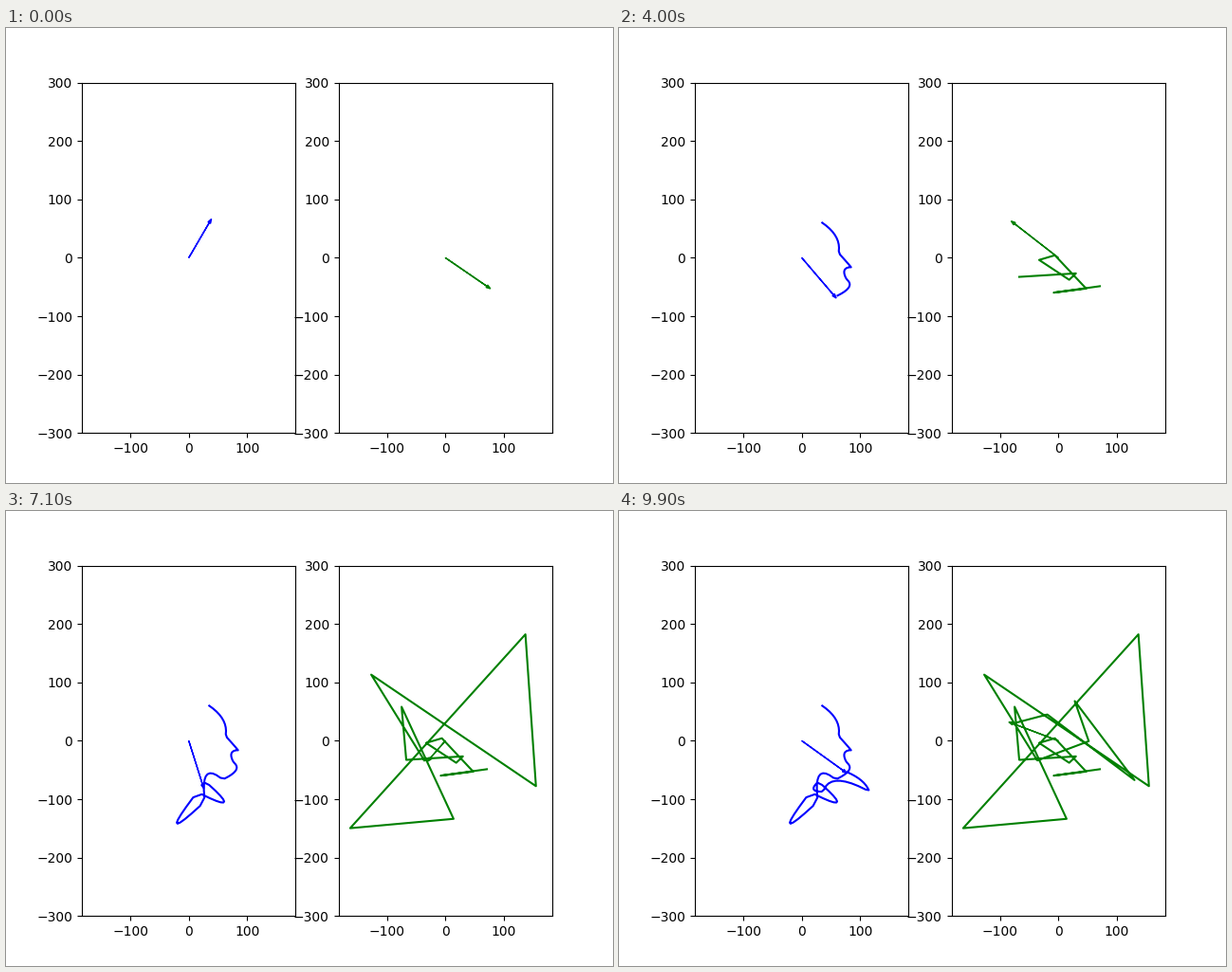
Recreate the animation shown at these times as a matplotlib script. Size 640 px wide and 480 px high, loop 10 s.

```python
import numpy as np
import matplotlib.pyplot as plt
from matplotlib.animation import FuncAnimation

FRAMES = 100
LEG = 10     # frames per leg
DT = 0.1
START = (35, 60)

# Velocity on the first and last frame of every leg
KEYS = np.array([
    (71, -48.7), (-8, -59.7),
    (47.5, -52.7), (-6, 4.3),
    (-33, -3.7), (18.5, -37.7),
    (30, -26.7), (-67, -32.7),
    (-75, 58.3), (14, -133.7),
    (-163, -149.7), (137, 182.3),
    (155, -77.7), (-127, 113.3),
    (-36, -33.7), (52, -0.7),
    (28, 68), (130.3, -67.3),
    (-19, 45), (-78, 29.5),
])

frames = np.arange(FRAMES)
leg_starts = np.arange(0, FRAMES, LEG)
key_frames = np.column_stack([leg_starts, leg_starts + LEG - 1]).ravel()

# Velocity is linear between keys; position is its trapezoidal integral
vel = np.column_stack([np.interp(frames, key_frames, k) for k in KEYS.T])
steps = (vel[:-1] + vel[1:]) / 2 * DT
pos = np.cumsum(np.vstack([START, steps]), axis=0)

fig, axes = plt.subplots(1, 2, figsize=(6.4, 4.8), dpi=100)


def make_plot(ax, data, color):
    ax.set_xlim(-183, 183)
    ax.set_ylim(-300, 300)
    ax.set_xticks([-100, 0, 100])
    arrow = ax.arrow(0, 0, *data[0], head_width=5, color=color)
    trail, = ax.plot([], [], color=color)
    return data, arrow, trail


plots = [make_plot(axes[0], pos, "b"), make_plot(axes[1], vel, "g")]


def update(i):
    for data, arrow, trail in plots:
        arrow.set_data(dx=data[i, 0], dy=data[i, 1])
        trail.set_data(data[:i, 0], data[:i, 1])  # trails one frame behind
    return [artist for p in plots for artist in p[1:]]


anim = FuncAnimation(fig, update, frames=FRAMES, interval=100,
                     repeat=True, repeat_delay=0)
plt.show()
```
